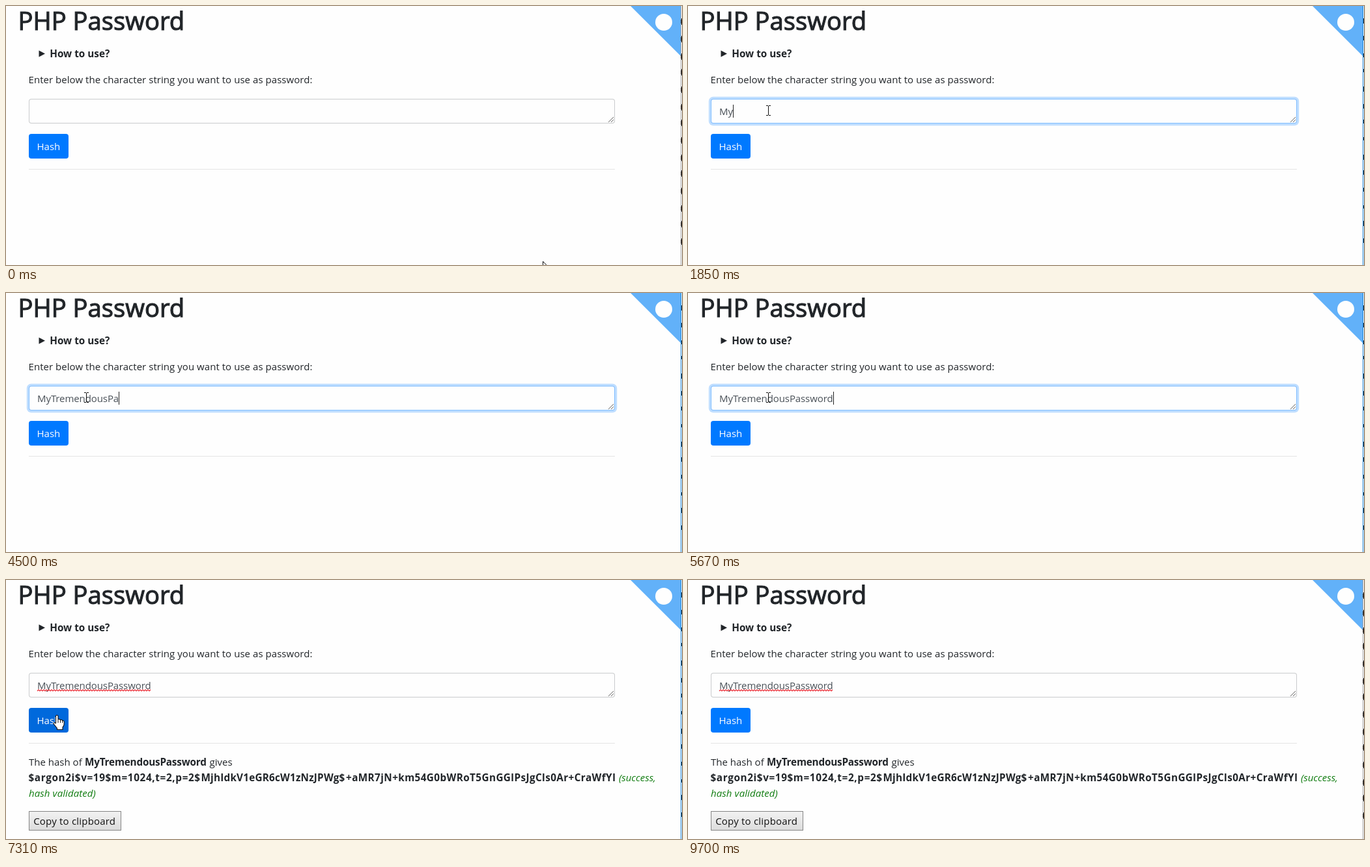
Recreate the animation shown at these times as an HTML page with a canvas. Size 1038x399 px, loop 9.79 s.

```html
<!DOCTYPE html>
<html lang="en">
<head>
<meta charset="utf-8">
<title>PHP Password</title>
<style>
html, body { margin: 0; width: 100%; height: 100%; overflow: hidden; background: #fefefe; }
canvas { display: block; }
</style>
</head>
<body>
<canvas id="stage" width="1038" height="399"></canvas>
<script>
const ctx = document.getElementById('stage').getContext('2d');
const LOOP = 9790;
const INK = '#212529';
const BODY = '15px "Open Sans", sans-serif';
const BOLD = 'bold 15.3px "Open Sans", sans-serif';
const ITALIC = 'italic 15px "Open Sans", sans-serif';
const TITLE = '38.2px "Open Sans", sans-serif';
const WORD = 'MyTremendousPassword';

// When each letter of WORD is typed
const KEYS = [1680, 1850, 2700, 2870, 2940, 3100, 3250, 3420, 3720, 3800,
  3870, 3950, 4350, 4500, 4650, 4820, 5050, 5200, 5350, 5670];
const CARET_ON = [[680, 1220], [1680, 2380], [2700, 6220], [6760, 7070]];

const within = (t, a, b) => t >= a && t < b;
const clamp = (v) => Math.max(0, Math.min(1, v));
const smooth = (p) => p * p * (3 - 2 * p);

// Index of the last tick reached; below 0 before the first one
function tick(t, from, to, count) {
  return Math.min(count - 1, Math.floor((t - from + 5) * (count - 1) / (to - from)));
}

function glide(a, b, p) {
  const e = smooth(clamp(p));
  return [Math.round(a[0] + (b[0] - a[0]) * e), Math.round(a[1] + (b[1] - a[1]) * e)];
}

function text(str, x, y, font = BODY, color = INK, spacing = 0) {
  ctx.font = font;
  ctx.letterSpacing = spacing + 'px';
  ctx.fillStyle = color;
  ctx.fillText(str, x, y);
}

// Regular weight thickened to a semibold
function heading(str, x, y) {
  text(str, x, y, TITLE);
  ctx.strokeStyle = INK;
  ctx.lineWidth = 1.1;
  ctx.lineJoin = 'miter';
  ctx.strokeText(str, x, y);
}

function rect(x, y, w, h, color) {
  ctx.fillStyle = color;
  ctx.fillRect(x, y, w, h);
}

function round(x, y, w, h, r, color) {
  ctx.beginPath();
  ctx.roundRect(x, y, w, h, r);
  ctx.fillStyle = color;
  ctx.fill();
}

function disc(x, y, r, color) {
  ctx.beginPath();
  ctx.arc(x, y, r, 0, Math.PI * 2);
  ctx.fillStyle = color;
  ctx.fill();
}

function line(points, color, width = 1) {
  ctx.beginPath();
  points.forEach(([x, y]) => ctx.lineTo(x, y));
  ctx.strokeStyle = color;
  ctx.lineWidth = width;
  ctx.stroke();
}

function shape(points, fill, stroke) {
  ctx.beginPath();
  points.forEach(([x, y]) => ctx.lineTo(x, y));
  ctx.closePath();
  ctx.fillStyle = fill;
  ctx.fill();
  if (stroke) {
    ctx.strokeStyle = stroke;
    ctx.lineWidth = 1;
    ctx.stroke();
  }
}

function drawPage() {
  rect(0, 0, 1038, 399, '#fefefe');
  shape([[959, 0], [1036, 0], [1036, 77]], '#62b1f9');
  disc(1010, 25, 13, '#fefefe');
  heading('PHP Password', 18.5, 37);
  shape([[50.5, 68.5], [60, 73.5], [50.5, 78.5]], INK);
  text('How to use?', 67.2, 79, BOLD);
  text('Enter below the character string you want to use as password:',
    34.5, 119, BODY, INK, 0.045);
  rect(35, 251, 900, 1, '#e4e4e4');
}

function drawEdge(active) {
  rect(1036, 0, 1, 399, active ? '#1883d7' : '#a5a5a5');
  for (let i = 0; i < 14; i++) {
    const y = 19 + i * 26;
    rect(1037, y + i % 3, 1, active ? 8 - i % 4 : 10, '#222');
    if (!active) rect(1036, y + 2 + i % 3, 1, 6, '#4a4038');
  }
}

function drawField(t, typed, glow, checked) {
  if (glow) round(31.8, 139.8, 906.4, 44.4, 7, `rgba(0,123,255,${0.25 * glow})`);
  round(35, 143, 900, 38, 4, glow > 0.5 ? '#80bdff' : '#c9cbcd');
  round(36, 144, 898, 36, 3, '#fefefe');
  line([[925, 179], [933, 171]], '#666');
  line([[929, 179], [933, 175]], '#666');
  text(typed, 48, 168, BODY, '#495057', -0.1);
  if (CARET_ON.some(([a, b]) => within(t, a, b))) {
    const x = 48 + Math.round(ctx.measureText(typed).width);
    rect(Math.min(x, 223), 152, 1, 20, '#222');
  }
  if (checked) {
    const wave = [];
    for (let x = 48; x <= 222; x += 2) wave.push([x, x % 4 ? 169 : 171]);
    line(wave, '#e8202a', 1.1);
  }
}

function drawButton(color) {
  round(35, 197, 61, 38, 4, color);
  text('Hash', 47.5, 222, BODY, '#fff');
}

function drawResult() {
  text('The hash of ', 35, 286);
  text(WORD, 121, 286, BOLD, INK, -0.2);
  text('gives', 312.5, 286);
  text('$argon2i$v=19$m=1024,t=2,p=2$', 34.5, 310, BOLD, INK, 0.62);
  text('MjhIdkV1eGR6cW1zNzJPWg$', 299.5, 310, BOLD, INK, 0.2);
  text('+aMR7jN+km54G0bWRoT5GnGGlPsJgCls0Ar+CraWfYI', 522, 310, BOLD, INK, 0.4);
  text('(success,', 941, 310, ITALIC, '#107c10');
  text('hash validated)', 35, 334, ITALIC, '#107c10', 0.1);

  rect(35, 356, 142, 30, '#858585');
  const sheen = ctx.createLinearGradient(0, 357, 0, 385);
  sheen.addColorStop(0, '#f2f2f2');
  sheen.addColorStop(1, '#dcdcdc');
  rect(36, 357, 140, 28, sheen);
  text('Copy to clipboard', 42.2, 377, BODY, '#111', 0.2);
}

const CURSORS = {
  arrow() {
    shape([[0.5, 0.5], [0.5, 16.5], [4.2, 13], [6.6, 18.5], [9, 17.5],
      [6.7, 12.1], [11.8, 12.1]], '#fff', '#111');
  },
  beam() {
    line([[0.5, -7], [0.5, 7]], '#111');
    for (const y of [-7.5, 7.5]) {
      line([[-3, y], [0, y]], '#111');
      line([[1, y], [4, y]], '#111');
    }
  },
  hand() {
    ctx.beginPath();
    ctx.moveTo(-1.5, 13);
    ctx.lineTo(-1.5, 1.5);
    ctx.quadraticCurveTo(0.3, -1, 2, 1.5);
    ctx.lineTo(2, 7);
    ctx.quadraticCurveTo(4, 5.5, 5.5, 7.6);
    ctx.quadraticCurveTo(7.5, 6.5, 8.7, 8.7);
    ctx.quadraticCurveTo(11, 8, 11.3, 11);
    ctx.lineTo(11, 15.5);
    ctx.lineTo(9, 19);
    ctx.lineTo(9, 22.5);
    ctx.lineTo(0.5, 22.5);
    ctx.lineTo(0.5, 20.5);
    ctx.lineTo(-5, 13.5);
    ctx.quadraticCurveTo(-5, 10.2, -1.5, 13);
    ctx.fillStyle = '#fff';
    ctx.fill();
    ctx.strokeStyle = '#111';
    ctx.lineWidth = 1.1;
    ctx.stroke();
    for (const x of [2, 5.5, 8.7]) line([[x, 8], [x, 12]], '#111');
  }
};

const ENTRY = [824, 393], FIELD = [123, 161], BUTTON = [78, 208];
const PAUSE = [109, 268], EXIT = [853, 394];

function pointer(t) {
  if (t < 6440) return glide(ENTRY, FIELD, (tick(t, 70, 760, 10) + 1) / 8);
  if (t < 7765) return glide(FIELD, BUTTON, (tick(t, 6450, 7310, 12) + 1) / 8);
  const k = tick(t, 7770, 8610, 12);
  if (k === 11) return null;
  return k <= 2 ? glide(BUTTON, PAUSE, (k + 1) / 3) : glide(PAUSE, EXIT, (k - 2) / 8);
}

function cursorKind([x, y], result) {
  if (within(x, 35, 935) && within(y, 143, 181)) return 'beam';
  if (within(x, 35, 96) && within(y, 197, 235)) return 'hand';
  if (result && within(y, 271, 338)) return 'beam';
  return 'arrow';
}

function draw(t) {
  const pos = pointer(t);
  const result = t >= 7305;
  const kind = pos && cursorKind(pos, result);
  const pressed = within(t, 7065, 7225);
  const clicked = pressed || within(t, 605, 755);
  const glow = within(t, 755, 7225) ? 1
    : within(t, 675, 755) || within(t, 7225, 7305) ? 0.5 : 0;

  drawPage();
  drawEdge(within(t, 605, 9700));
  drawField(t, WORD.slice(0, KEYS.filter((k) => t >= k).length), glow, t >= 7065);
  drawButton(pressed ? '#0062d0' : kind === 'hand' ? '#0069dc' : '#0079ff');
  if (result) drawResult();

  if (!pos) return;
  if (clicked) disc(pos[0] - 1, pos[1], 12, 'rgba(255,255,0,0.48)');
  ctx.save();
  ctx.translate(pos[0], pos[1]);
  CURSORS[kind]();
  ctx.restore();
}

const start = performance.now();
function loop() {
  draw((performance.now() - start) % LOOP);
  requestAnimationFrame(loop);
}
loop();
</script>
</body>
</html>
```
